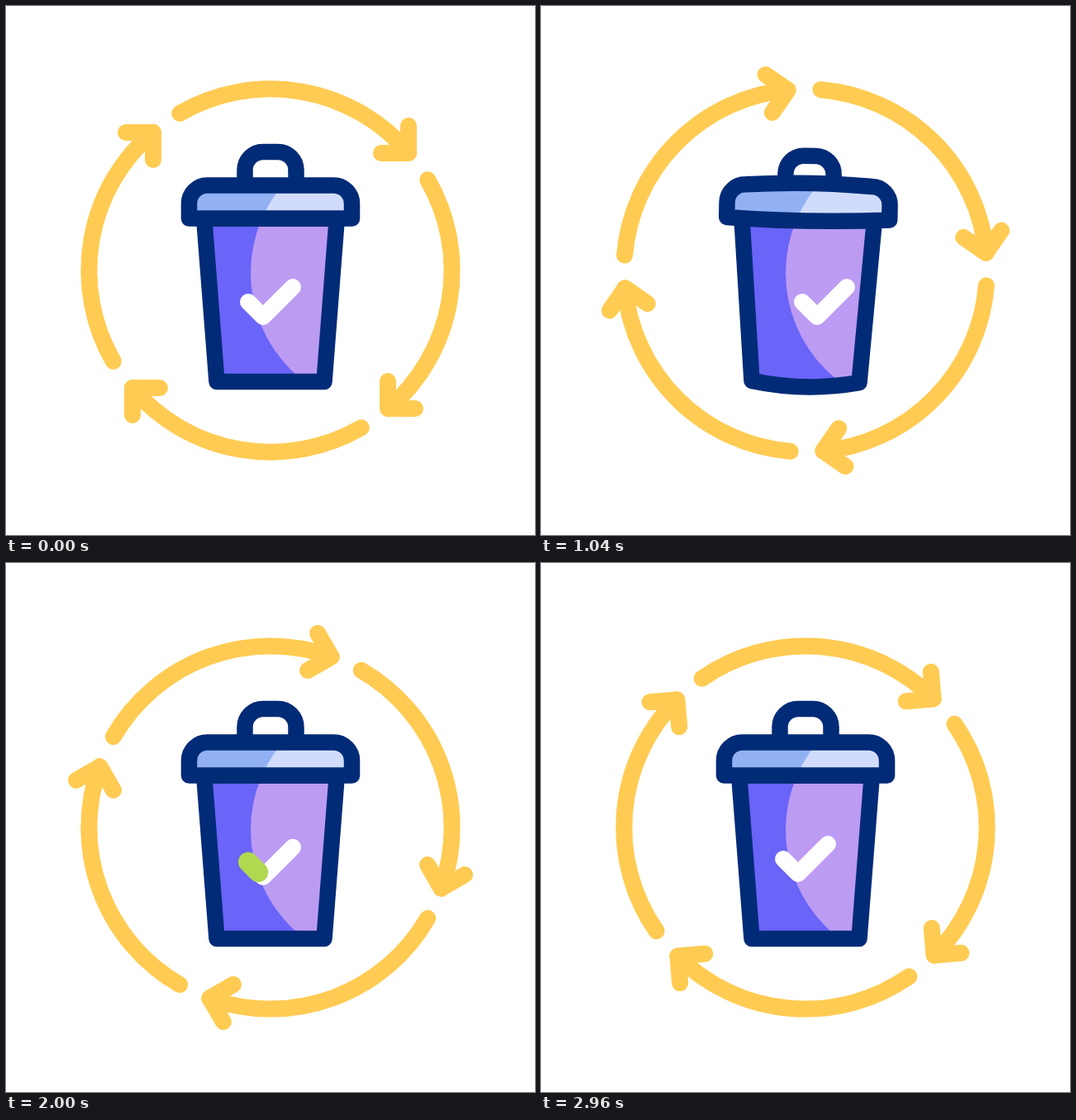
Write an HTML page with a canvas that moves like this. It is 640 px wide and 640 px high and loops after 3000 ms.

```html
<!DOCTYPE html>
<html lang="en">
<head>
<meta charset="utf-8">
<title>Recycling bin</title>
<style>
  html, body { margin: 0; height: 100%; overflow: hidden; background: #fff; }
  canvas { display: block; width: 100vw; height: 100vh; }
</style>
</head>
<body>
<canvas id="stage" width="640" height="640"></canvas>
<script>
const ctx = document.getElementById('stage').getContext('2d');
const LOOP = 3000, STEP = 40, RAD = Math.PI / 180;
const NAVY = '#022b77', YELLOW = '#ffcb52', GREEN = '#b0d94f';

// Eased progress from 0 to 1 between two times
function ease(t, from, to) {
  const x = Math.min(1, Math.max(0, (t - from) / (to - from)));
  return x * x * (3 - 2 * x);
}
const swell = (t, from, peak, to) => ease(t, from, peak) - ease(t, peak, to);

function stroke(path, color, width) {
  ctx.strokeStyle = color;
  ctx.lineWidth = width;
  ctx.stroke(path);
}

// Outlined shape whose right part is lit by a fixed large disc
function shape(path, base, light) {
  ctx.save();
  ctx.clip(path);
  ctx.fillStyle = base;
  ctx.fill(path);
  ctx.resetTransform();
  ctx.beginPath();
  ctx.arc(461, 323, 165, 0, 7);
  ctx.fillStyle = light;
  ctx.fill();
  ctx.restore();
  stroke(path, NAVY, 19.5);
}

function drawArrows(t) {
  const arrow = new Path2D('M167-175V-142H134');
  const arc = new Path2D();
  arc.arc(0, 0, 219.6, -120 * RAD, -40.4 * RAD);
  ctx.save();
  ctx.translate(320, 320);
  ctx.rotate(t / LOOP * 2 * Math.PI);
  for (let i = 0; i < 4; i++) {
    stroke(arc, YELLOW, 20);
    stroke(arrow, YELLOW, 20);
    ctx.rotate(Math.PI / 2);
  }
  ctx.restore();
}

function drawBin(t) {
  const tilt = 1.245 * swell(t, 0, 560, 1180);
  const bulge = 16.2 * swell(t, 0, 560, 1400);
  const bend = bulge * 0.9;

  function lidSpace(draw) {
    ctx.save();
    ctx.translate(320 + 20 * tilt, 257 + tilt);
    ctx.rotate(6.2 * RAD * tilt);
    draw();
    ctx.restore();
  }

  lidSpace(() => {
    const half = 31 - bulge * 0.3, mid = 5 * tilt, top = -80.5 + bulge * 0.72;
    const handle = new Path2D();
    handle.moveTo(mid - half, -38);
    handle.arcTo(mid - half, top, mid, top, 22);
    handle.arcTo(mid + half, top, mid + half, -38, 22);
    handle.lineTo(mid + half, -38);
    stroke(handle, NAVY, 19.5);
  });

  const shift = 20 * tilt, drop = 7 * tilt;
  const body = new Path2D(`M${239.7 + shift} ${257 - drop}
    L255 ${454.5 - drop} Q320 ${454.5 + 2 * bulge} 385 ${454.5 + drop}
    L${400.3 + shift} ${257 + drop}Z`);
  shape(body, '#6a64f8', '#bc9bf3');

  lidSpace(() => {
    const lid = new Path2D(`M-98.5 0V-18A22 22 0 0 1-76.5-40
      Q0 ${-40 - bend} 76.5-40A22 22 0 0 1 98.5-18V0Q0 ${bend}-98.5 0Z`);
    shape(lid, '#92b1f3', '#d1dcfc');
  });
}

function drawCheck(t) {
  const check = new Path2D('M293 358L311 376L347 340');
  const length = 54 * Math.SQRT2;
  const from = length * ease(t, 2160, 2680), to = length * ease(t, 1840, 2360);
  const x = 31 * swell(t, 0, 800, 1520);
  const y = 5 * ease(t, 1440, 1920) - 17 * ease(t, 1920, 2420) + 12 * ease(t, 2420, 2880);
  ctx.save();
  ctx.translate(x, y);
  stroke(check, '#fff', 20);
  if (to - from > 0.01) {
    ctx.setLineDash([to - from, 2 * length]);
    ctx.lineDashOffset = -from;
    stroke(check, GREEN, 24);
  }
  ctx.restore();
}

function frame(now) {
  const t = Math.floor(now % LOOP / STEP) * STEP;
  ctx.clearRect(0, 0, 640, 640);
  ctx.lineCap = ctx.lineJoin = 'round';
  drawArrows(t);
  drawBin(t);
  drawCheck(t);
  requestAnimationFrame(frame);
}
requestAnimationFrame(frame);
</script>
</body>
</html>
```
